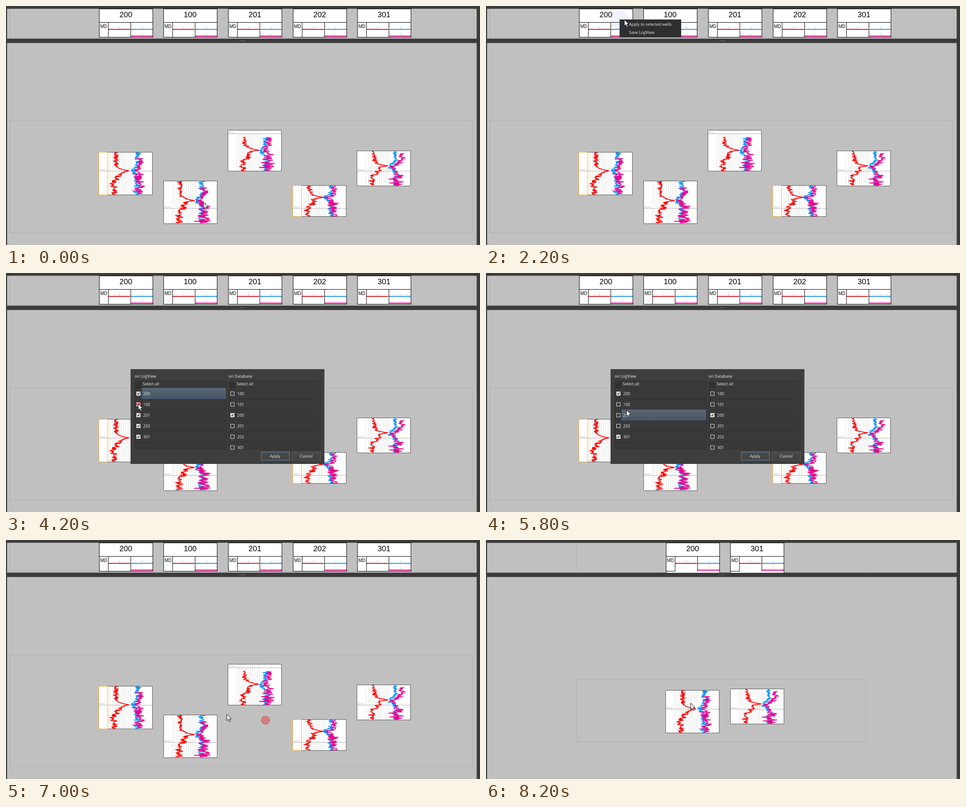
Recreate the animation shown at these times as an HTML page with a canvas. Size 1054 px wide and 532 px high, loop 8400 ms.

```html
<!DOCTYPE html>
<html lang="en">
<head>
<meta charset="utf-8">
<title>Well log panel</title>
<style>
  html, body { margin: 0; width: 100%; height: 100%; overflow: hidden; background: #3c3c3c; }
  canvas { display: block; width: 1054px; height: 532px; }
</style>
</head>
<body>
<canvas id="stage" width="1054" height="532"></canvas>
<script>
const ctx = document.getElementById('stage').getContext('2d');
const LOOP = 8400, STEP = 200, PITCH = 143.65;
const ARIAL = '"Liberation Sans", Arial, sans-serif';
const UI = '9px "Open Sans", "Noto Sans", sans-serif';
const RED = '#ff0000', BLUE = '#0a95ff', PINK = '#ec008c';
const EDGE = '#b0b0b0', LIGHT = '#eee';

// ---------- helpers ----------
function fill(x, y, w, h, color) {
  ctx.fillStyle = color;
  ctx.fillRect(x, y, w, h);
}

function frame(x, y, w, h, color) {
  ctx.strokeStyle = color;
  ctx.lineWidth = 1;
  ctx.strokeRect(x + .5, y + .5, w - 1, h - 1);
}

function text(s, x, y, font, color, align = 'left') {
  ctx.font = font;
  ctx.fillStyle = color;
  ctx.textAlign = align;
  ctx.fillText(s, x, y);
}

function shade(y, h, top, bottom) {
  const g = ctx.createLinearGradient(0, y, 0, y + h);
  g.addColorStop(0, top);
  g.addColorStop(1, bottom);
  return g;
}

function at(x, y, paint) {
  ctx.save();
  ctx.translate(x, y);
  paint();
  ctx.restore();
}

function random(seed) {
  return () => {
    seed = (seed * 1664525 + 1013904223) >>> 0;
    return seed / 4294967296;
  };
}

const ease = u => u * u * (3 - 2 * u);

// ---------- well logs ----------
// peak: depth of the red maximum, rule: depth of the marker line
const wells = [
  { name: '200', y: 325, h: 96, peak: 42, rule: 42, gold: true },
  { name: '100', y: 389, h: 96, peak: 44, rule: 61 },
  { name: '201', y: 276, h: 92, peak: 45, rule: 8, top: 16 },
  { name: '202', y: 399, h: 70, peak: 27, rule: 51, gold: true },
  { name: '301', y: 322, h: 79, peak: 34, rule: 45, lean: 8 }
];

// Each log gives mean and spread at v, the depth below the red peak
const decay = (v, above, below) => Math.exp(-Math.abs(v) / (v < 0 ? above : below));

function redLog(v) {
  const peak = decay(v, 4, 2);
  const shelf = v > 0 && v < 20 ? 10 - v * .25 : 0;
  return [(v < 20 ? 38 : 34) + (32 - shelf) * peak + shelf, 6 * (1 - peak) + (v > 0 ? 2 : 0)];
}

function blueLog(v) {
  return [86 - 11 * Math.exp(-v * v / 60), 8];
}

function pinkLog(v, rnd, lean) {
  const spike = v > 12 && rnd() < .1 ? 14 : 0;
  const shift = v < 0 ? lean : 0;
  return [92 - 14 * decay(v, 6, 6) + shift - spike, v < 0 ? 9 : 12];
}

function trace(well, log, color, from, seed) {
  const rnd = random(seed);
  let n = 0;
  ctx.beginPath();
  for (let y = Math.max(1, from); y < well.h - 1; y += .7) {
    if (rnd() < .75) n = rnd() + rnd() - 1;
    const [mean, spread] = log(y - well.peak, rnd, well.lean || 0);
    ctx.lineTo(Math.min(118, Math.max(20, mean + n * spread * 1.2)), y);
  }
  ctx.strokeStyle = color;
  ctx.lineWidth = 1.8;
  ctx.lineJoin = 'round';
  ctx.stroke();
}

function card(well, x, y, gold) {
  const { h, rule, peak, top = 1 } = well;
  const seed = 7919 * +well.name;
  at(x, y, () => {
    fill(0, 0, 120, h, '#fff');
    for (let gx = 20; gx <= 70; gx += 5) fill(gx, 1, 1, h - 2, '#e2e2e2');
    fill(0, rule, 119, 1, '#b4b4b4');
    text('0 1 1 1', 3, rule - 1, '4px ' + ARIAL, '#666');
    trace(well, blueLog, BLUE, top, seed + 1);
    trace(well, redLog, RED, top, seed);
    trace(well, pinkLog, PINK, peak - 28, seed + 2);
    frame(0, 0, 120, h, '#555');
    if (gold) frame(0, 0, 21, h, '#f5a623');
  });
}

function header(name, x, h) {
  at(x, 6, () => {
    fill(0, 0, 120, h, '#fff');
    for (const [lx, ly, lh] of [[0, 0, h], [119, 0, h], [20, 30, 34], [70, 30, 34]]) fill(lx, ly, 1, lh, '#000');
    for (const ly of [0, 30]) fill(0, ly, 120, 1, '#000');
    fill(0, 63, h > 64 ? 20 : 120, 1, '#000');
    text(name, 59.5, 19, '17px ' + ARIAL, '#000', 'center');
    text('MD', 2.5, 43, '10px ' + ARIAL, '#000');
    for (const [lx, ly, color] of [[21, 45, '#e0161c'], [71, 45, '#2196f3'], [71, 60, PINK]]) {
      fill(lx, ly, 48, 2, color);
      fill(lx + 24, ly - 4, 1, 2, '#666');
    }
  });
}

function panel(y, h) {
  fill(2, y, 1045, h, '#c0c0c0');
  frame(2, y, 1045, h, '#8c8c8c');
}

function panels() {
  fill(0, 0, 1054, 532, '#3c3c3c');
  panel(6, 67);
  panel(82, 451);
  for (let x = 519; x < 533; x += 2.4) fill(x, 77, 1, 1, '#aaa');
}

function fullView() {
  panels();
  frame(8, 6, 1032, 64, EDGE);
  frame(8, 255, 1030, 250, EDGE);
  wells.forEach((w, i) => {
    header(w.name, Math.round(206.8 + i * PITCH), 64);
    card(w, Math.round(206 + i * PITCH - i * .1), w.y, w.gold);
  });
}

function reducedView() {
  panels();
  for (const x of [201, 845]) fill(x, 6, 1, 67, EDGE);
  frame(201, 310, 644, 140, EDGE);
  [wells[0], wells[4]].forEach((w, i) => {
    header(w.name, Math.round(399.7 + i * PITCH), 67);
    card(w, Math.round(399 + i * PITCH), w.y + 9);
  });
}

// ---------- menu and dialog ----------
function menu() {
  fill(297, 30, 137, 40, '#2e2e2e');
  text('Apply to selected wells', 318, 44, UI, LIGHT);
  text('Save LogView', 318, 62, UI, LIGHT);
}

function checkbox(x, y, on) {
  if (!on) return frame(x - 4, y - 4, 9, 9, '#e4e4e4');
  fill(x - 4, y - 4, 9, 9, '#f2f2f2');
  ctx.beginPath();
  ctx.moveTo(x - 2, y + .5);
  ctx.lineTo(x, y + 2.5);
  ctx.lineTo(x + 3, y - 2);
  ctx.strokeStyle = '#222';
  ctx.lineWidth = 1.4;
  ctx.stroke();
}

function list(x, title, names, width, isOn, selected) {
  text(title, x, 233, UI, LIGHT);
  fill(x, 240, 204, 153, '#393939');
  frame(x, 240, 204, 153, '#2d2d2d');
  fill(x + 3, 245, 11, 11, '#303030');
  frame(x + 3, 245, 11, 11, '#292929');
  text('Select all', x + 18, 250, UI, LIGHT);
  names.forEach((name, i) => {
    const y = 268 + i * 24;
    if (y < 380) fill(x + 1, y + 12, width, 1, '#2f2f2f');
    if (name === selected) {
      fill(x + 17, y - 11, 186, 22, shade(y - 11, 22, '#5c6570', '#475564'));
      frame(x + 16, y - 12, 187, 24, '#4a6f98');
    }
    checkbox(x + 8, y, isOn(name));
    text(name, x + 19, y + 4, UI, LIGHT);
  });
}

function button(label, x, border) {
  fill(x, 398, 64, 19, shade(398, 19, '#4c4c4c', '#404040'));
  frame(x, 398, 64, 19, border);
  text(label, x + 31.5, 411, UI, LIGHT, 'center');
}

function dialog(t) {
  const done = clicks.filter(c => c.well && t > c.t + 190).map(c => c.well);
  const names = wells.map(w => w.name);
  fill(277, 214, 431, 211, '#3e3e3e');
  list(286, 'on LogView', names, 202, name => !done.includes(name), done[done.length - 1] || '200');
  list(495, 'on Database', ['100', '101', '200', '201', '202', '301'], 191, name => name === '200');
  frame(688, 241, 9, 64, '#444');
  button('Apply', 567, '#5f93c4');
  button('Cancel', 636, '#5a5a5a');
}

// ---------- pointer ----------
const clicks = [
  { t: 2360, x: 335, y: 38 },
  { t: 4020, x: 295, y: 292, well: '100' },
  { t: 4500, x: 295, y: 340, well: '202' },
  { t: 5040, x: 295, y: 316, well: '201' },
  { t: 6640, x: 577, y: 401 }
];

// Eased arcs: time span, end point and the point the arc bends towards
const moves = [
  { span: [100, 1200], to: [297, 31], via: [320, -80] },
  { span: [2000, 2500], to: [335, 38], via: [310, 28] },
  { span: [2550, 4000], to: [294, 291], via: [480, 412] },
  { span: [4200, 4600], to: [295, 340], via: [298, 320] },
  { span: [4600, 5000], to: [295, 316], via: [320, 400] },
  { span: [5690, 6600], to: [577, 401], via: [514, 170] },
  { span: [6650, 7250], to: [455, 363], via: [495, 405] }
];

function pointerAt(t) {
  let pos = [439, 437];
  for (const { span: [a, b], to, via } of moves) {
    if (t <= a) break;
    const p = ease(Math.min(1, (t - a) / (b - a))), q = 1 - p;
    pos = pos.map((from, i) => q * q * from + 2 * p * q * via[i] + p * p * to[i]);
  }
  return pos;
}

function ring(x, y, r, color, alpha) {
  ctx.save();
  ctx.beginPath();
  ctx.arc(x, y, r, 0, Math.PI * 2);
  ctx.fillStyle = ctx.strokeStyle = color;
  ctx.globalAlpha = alpha * .5;
  ctx.fill();
  ctx.globalAlpha = alpha;
  ctx.lineWidth = 1.2;
  ctx.setLineDash([4, 2]);
  ctx.stroke();
  ctx.restore();
}

function rings(t) {
  const age = t - 1700;
  if (age > 0 && age < 540) ring(297, 31, age * .04, '#5050d8', 1 - age / 580);
  for (const c of clicks) {
    const a = t - c.t;
    if (a > 0 && a < 690) ring(c.x, c.y, a * .025, '#e62828', Math.min(.85, (690 - a) / 250));
  }
}

function pointer(t) {
  at(...pointerAt(t), () => {
    ctx.beginPath();
    for (const [x, y] of [[0, 0], [0, 14], [3.2, 11], [5.6, 16.5], [8, 15.5], [5.7, 10.2], [10, 10]]) ctx.lineTo(x, y);
    ctx.closePath();
    ctx.fillStyle = '#fff';
    ctx.fill();
    ctx.strokeStyle = '#000';
    ctx.lineWidth = 1;
    ctx.stroke();
  });
}

function draw(now) {
  const t = Math.floor((now % LOOP) / STEP) * STEP;
  if (t < 7200) fullView();
  else reducedView();
  if (t >= 1900 && t < 2500) menu();
  if (t >= 2600 && t < 6800) dialog(t);
  rings(t);
  pointer(t);
}

const start = performance.now();
function tick() {
  draw(performance.now() - start);
  requestAnimationFrame(tick);
}
tick();
</script>
</body>
</html>
```
